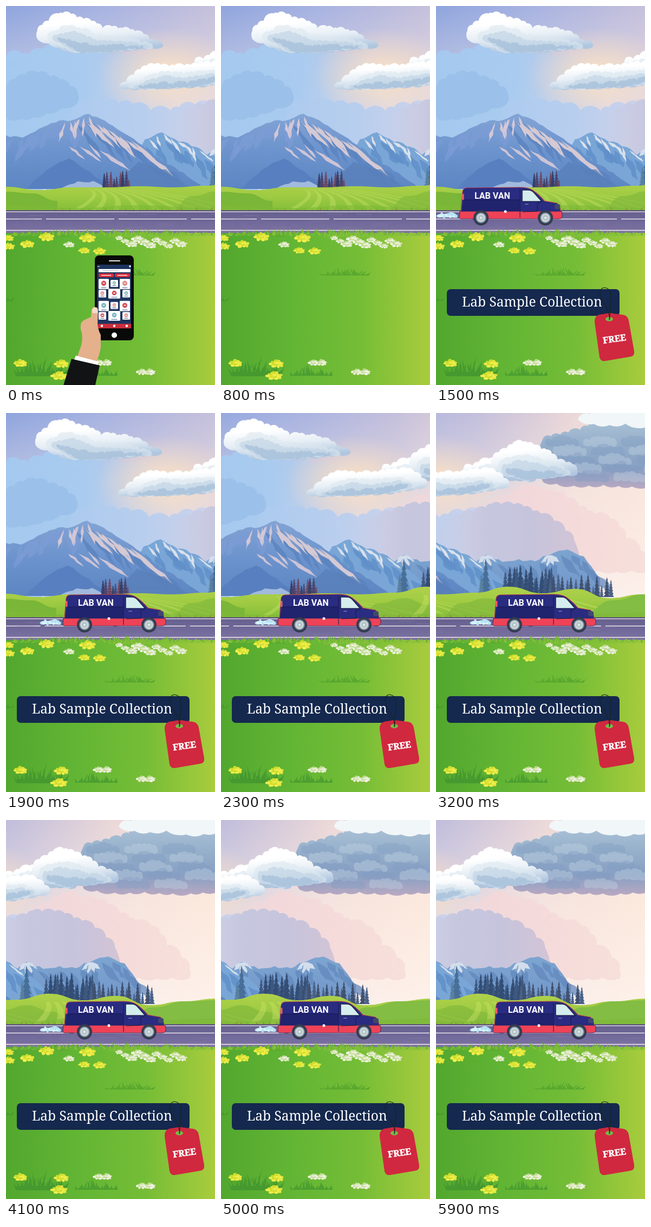
Write an HTML page that moves like this. It is 386 by 696 pixels and loops after 8000 ms.

```html
<!DOCTYPE html>
<html lang="en">
<head>
<meta charset="utf-8">
<title>Lab Sample Collection</title>
<style>
  html, body { margin: 0; width: 100%; height: 100%; overflow: hidden; background: #62b534; }
  svg { display: block; width: 386px; height: 696px; }
  .serif { font-family: "Noto Serif", serif; fill: #fff; }
  .sans { font-family: Roboto, sans-serif; font-weight: 700; fill: #fff; }
</style>
</head>
<body>
<svg id="stage" viewBox="0 0 386 696" xmlns="http://www.w3.org/2000/svg"></svg>
<script>
let seed = 7;
const random = () => {
  seed = (seed * 16807) % 2147483647;
  return seed / 2147483647;
};
const between = (a, b) => a + (b - a) * random();
const mix = (a, b, t) => a + (b - a) * t;
const repeat = (n, fn) => Array.from({ length: n }, (_, i) => fn(i)).join('');
const f = n => n.toFixed(1);

// Value at t (0..1) on evenly spaced keys.
function along(keys, t) {
  const p = Math.max(0, Math.min(1, t)) * (keys.length - 1);
  const i = Math.min(Math.floor(p), keys.length - 2);
  return mix(keys[i], keys[i + 1], p - i);
}

const path = (d, fill, extra = '') => `<path d="${d}" fill="${fill}" ${extra}/>`;
const rect = (x, y, w, h, fill, r = 0, extra = '') =>
  `<rect x="${f(x)}" y="${f(y)}" width="${f(w)}" height="${f(h)}" rx="${r}" fill="${fill}" ${extra}/>`;
const ellipse = (x, y, rx, ry, fill, extra = '') =>
  `<ellipse cx="${f(x)}" cy="${f(y)}" rx="${f(rx)}" ry="${f(ry)}" fill="${fill}" ${extra}/>`;
const disc = (x, y, r, fill, extra) => ellipse(x, y, r, r, fill, extra);
const opacity = a => `opacity="${a}"`;

// Colours are spread evenly; a colour may carry its own alpha.
const gradient = (id, end, ...colors) =>
  `<linearGradient id="${id}" ${end}>` +
  colors.map((c, i) => `<stop offset="${i / (colors.length - 1)}" stop-color="${c}"/>`).join('') +
  '</linearGradient>';
const across = 'x2="1"', down = 'x2="0" y2="1"';

// Soft mass with n round bumps between an upper and a lower line.
function billow(x0, x1, tops, bottoms, n, jitter, fill, extra) {
  const at = (keys, t, j) => [
    mix(x0, x1, t) + (t > 0 && t < 1 ? between(-0.3, 0.3) * (x1 - x0) / n : 0),
    along(keys, t) + between(-j, j)
  ];
  const upper = Array.from({ length: n + 1 }, (_, i) => at(tops, i / n, jitter));
  const m = Math.ceil(n * 0.6);
  const lower = Array.from({ length: m + 1 }, (_, i) => at(bottoms, 1 - i / m, jitter * 0.4));
  const points = [...upper, ...lower];
  let d = `M${points[0].map(f)}`;
  points.forEach((a, i) => {
    const b = points[(i + 1) % points.length];
    const r = f(Math.hypot(b[0] - a[0], b[1] - a[1]) * (i < n ? 0.66 : 1.1) + 0.1);
    d += `A${r} ${r} 0 0 1 ${b.map(f)}`;
  });
  return path(d + 'Z', fill, extra);
}

function cloud(x0, x1, tops, bottoms, n) {
  const layer = (lift, inset, fill, a) => {
    const w = (x1 - x0) * inset;
    const inner = tops.map((y, i) => mix(y, along(bottoms, i / (tops.length - 1)), lift));
    return billow(x0 + w, x1 - w, inner, bottoms, n, 3, fill, opacity(a));
  };
  return billow(x0, x1, tops, bottoms, n, 3.5, 'url(#cloud)') +
    layer(0.35, 0.08, '#dde8f1', 0.6) + layer(0.55, 0.12, '#bed2e5', 0.6) + layer(0.8, 0.16, '#9bb8d6', 0.55);
}

function ridge(x0, x1, keys, fill, extra, base = 336) {
  const n = (keys.length - 1) * 4;
  let d = `M${x0} ${base}`;
  for (let i = 0; i <= n; i++) d += `L${f(mix(x0, x1, i / n))} ${f(along(keys, i / n) + between(-2, 2))}`;
  return path(`${d}L${x1} ${base}Z`, fill, extra);
}

// Jagged tapering band running from (x, y) at an angle.
function gash(x, y, length, angle, width, fill, a = 1) {
  const c = Math.cos(angle), s = Math.sin(angle);
  const edge = (t, side) => {
    const w = side * width * Math.sin(Math.PI * t) * between(0.2, 1);
    return `${f(x + length * t * c - w * s)} ${f(y + length * t * s + w * c)}`;
  };
  const steps = [0, 0.2, 0.4, 0.6, 0.8, 1];
  return path(`M${steps.map(t => edge(t, 1)).join('L')}L${steps.map(t => edge(1 - t, -1)).join('L')}Z`, fill, opacity(a));
}

function slope(x0, x1, keys, fill, extra) {
  const step = (x1 - x0) / (keys.length - 1);
  let d = `M${x0} 378V${keys[0]}`;
  keys.slice(1).forEach((y, i) => {
    const x = x0 + step * i;
    d += `C${f(x + step / 2)} ${keys[i]} ${f(x + step / 2)} ${y} ${f(x + step)} ${y}`;
  });
  return path(d + 'V378Z', fill, extra);
}

function tree(x, base, h, fill) {
  let left = '', right = '';
  for (let i = 1; i <= 6; i++) {
    const y = f(base - h + h * i / 6), w = h * 0.026 * i + 0.7;
    right += `L${f(x + w)} ${y}L${f(x + w * 0.5)} ${y}`;
    left = `L${f(x - w * 0.5)} ${y}L${f(x - w)} ${y}` + left;
  }
  return path(`M${f(x)} ${f(base - h)}${right}${left}Z`, fill);
}
const forest = (n, x0, x1, base, h0, h1, ...fills) =>
  repeat(n, i => tree(mix(x0, x1, i / (n - 1)) + between(-2, 2), base, between(h0, h1), fills[i % fills.length]));

function blades(x0, x1, base, h, step, fill, lean = 1) {
  let d = '';
  for (let x = x0; x < x1; x += step) {
    const t = Math.sin(Math.PI * (x - x0) / (x1 - x0)) * 0.6 + 0.4;
    d += `M${f(x - 2)} ${base}L${f(x + between(-5, 7) * lean)} ${f(base - h * t * between(0.35, 1))}L${f(x + 3)} ${base}Z`;
  }
  return path(d, fill);
}

const flower = (x, y, r, colors) => repeat(18, i => {
  const turn = i * 2.4, d = Math.sqrt(i / 18) * r;
  return ellipse(x + d * Math.cos(turn), y + d * 0.55 * Math.sin(turn), r * between(0.2, 0.36), r * between(0.14, 0.26), colors[i % colors.length]);
});
const yellow = ['#c9dc2c', '#e2e53b', '#f1ee4d'];
const white = ['#bddb8d', '#dfe9c6', '#f1f3e4'];

const defs = `<defs>
${gradient('sky', across, '#8fa5de', '#a8b3e1', '#c3bfdc', '#ecd8d8', '#fae3d5')}
${gradient('air', down, '#fff3e900', '#fff0e688', '#fff6f1c0')}
${gradient('haze', across, '#a4c8ef', '#a9cbef', '#b9cfee00')}
${gradient('mist', across, '#abcbef', '#b8ceee', '#cfd3ea', '#e6d8e400')}
${gradient('blush', across, '#f2d6d800', '#f2d8da', '#f5dcda', '#f7dfda')}
${gradient('lilac', across, '#cdcde400', '#c6c8e0', '#c6c4dc', '#d3c4d6')}
${gradient('cloud', 'x2=".25" y2="1"', '#fff', '#fff', '#e6eef5', '#b0c6df')}
${gradient('storm', down, '#d3e2ed', '#a5bdd3', '#94aeca', '#879fc3', '#b9a9c2')}
${gradient('peak', down, '#83a4d5', '#6c93cd', '#5c86c2')}
${gradient('far', down, '#7da5d0', '#7196ca')}
${gradient('hill', down, '#b0d14b', '#9fcb43', '#82bc38')}
${gradient('road', down, '#655f8d', '#706999', '#7d73a2')}
${gradient('meadow', across, '#52a72e', '#62b534', '#75bd36', '#a9cc3d')}
<radialGradient id="glow"><stop stop-color="#fbe2c4"/><stop offset="1" stop-color="#fbdfc4" stop-opacity="0"/></radialGradient>
</defs>`;

const sky =
  rect(0, 0, 740, 340, 'url(#sky)') + rect(0, 0, 740, 340, 'url(#air)') +
  billow(2, 290, [90, 88, 68, 80, 86, 95, 110], [335, 335], 13, 3, 'url(#haze)') +
  ellipse(300, 125, 130, 85, 'url(#glow)') +
  billow(130, 520, [180, 172, 194, 180, 190, 200], [335, 335], 14, 6, 'url(#mist)') +
  billow(2, 132, [140, 124, 127, 160], [208, 206, 195, 180], 7, 4, '#9bc1ea') +
  billow(350, 690, [200, 160, 136, 148, 180, 205, 270], [290, 290], 18, 4, 'url(#blush)') +
  billow(310, 552, [205, 182, 166, 168, 190, 235], [335, 335], 13, 4, 'url(#lilac)') +
  cloud(58, 290, [48, 14, 18, 38, 42, 50, 72], [60, 84, 84, 80, 76], 19) +
  billow(495, 745, [45, 30, 5, -10, -10], [128, 134, 132, 136, 130], 15, 4, 'url(#storm)') +
  repeat(14, i => billow(500 + i * 14, 560 + i * 14, [50 + i % 5 * 16, 42 + i % 5 * 16, 52 + i % 5 * 16], [60 + i % 5 * 16, 62 + i % 5 * 16], 6, 3,
    i % 2 ? '#c0d3e1' : '#7f9bc1', opacity(0.4))) +
  billow(560, 745, [8, -4, -4, -4], [14, 24, 20, 28, 20], 9, 3, '#f1f6f8') +
  cloud(350, 480, [98, 86, 88, 104], [118, 120, 124], 9) +
  cloud(402, 558, [82, 55, 52, 66, 84, 104], [110, 122, 118, 112], 14) +
  cloud(209, 432, [146, 118, 105, 112, 106, 104, 128], [150, 152, 149, 146, 134], 17);

const summit = [239, 240, 226, 213, 209, 199, 210, 231, 249, 275, 293, 311, 335];
const shoulder = [300, 245, 231, 248, 258, 278, 300, 335];
const horizon = [310, 282, 261, 273, 270, 271, 258, 249, 264, 305];
const scatter = (x0, x1, keys, from, to, n, fn) => repeat(n, i => {
  const t = mix(from, to, i / (n - 1));
  return fn(mix(x0, x1, t), along(keys, t));
});

const mountains =
  ridge(330, 600, horizon, 'url(#far)') +
  scatter(330, 600, horizon, 0.15, 0.95, 12, (x, y) => gash(x, y + 8, between(30, 60), between(0.7, 1.3), 10, '#6389bd', 0.75)) +
  [391, 507].map(x => repeat(4, i => gash(x, 261, 22, 0.6 + i * 0.6, 5, '#d3deec'))).join('') +
  ridge(225, 445, shoulder, '#79a6d6') +
  scatter(225, 445, shoulder, 0.15, 0.8, 9, (x, y) => gash(x, y + 14, between(35, 65), between(0.7, 1.2), 11, '#608fc8', 0.8)) +
  scatter(225, 445, shoulder, 0.18, 0.6, 8, (x, y) => gash(x, y + 3, between(16, 36), between(0.5, 1.4), 4, '#d9e1ed')) +
  ridge(0, 365, summit, 'url(#peak)') +
  scatter(0, 365, summit, 0.04, 0.4, 9, (x, y) => gash(x, y + 4, between(40, 75), between(1.8, 2.4), 11, '#7d9cd6', 0.7)) +
  scatter(0, 365, summit, 0.36, 0.8, 12, (x, y) => gash(x, y + 12, between(45, 80), between(0.7, 1.1), 9, '#5b84c0', 0.8)) +
  scatter(0, 365, summit, 0.3, 0.42, 6, (x, y) => gash(x, y + 3, between(22, 42), between(1.2, 2.2), 4.5, '#d3c8d6')) +
  scatter(0, 365, summit, 0.4, 0.72, 12, (x, y) => gash(x, y + between(2, 16), between(35, 65), between(0.6, 0.95), 5, '#d5c9d3')) +
  scatter(0, 365, summit, 0.32, 0.52, 5, (x, y) => gash(x, y + between(45, 65), between(35, 55), between(0.6, 0.9), 4.5, '#cdc4d6')) +
  ridge(38, 194, [335, 300, 279, 305, 335], '#587fc0') +
  ridge(195, 345, [330, 288, 302, 335], '#587fb8', opacity(0.75)) +
  ridge(104, 190, [334, 323, 322, 334], '#a1badd') +
  forest(9, 183, 226, 335, 16, 34, '#373e66', '#4b466f', '#704861') +
  tree(389, 330, 63, '#486f98') + tree(381, 330, 34, '#59809f') +
  forest(17, 427, 511, 334, 30, 57, '#3e587f', '#334d74') +
  forest(15, 508, 620, 338, 18, 44, '#496187', '#41516f');

const hills =
  slope(0, 740, [332, 338, 333, 333, 331, 333, 330, 319, 331, 323, 340, 333, 328], 'url(#hill)') +
  slope(0, 95, [341, 344, 358], '#7ab638') +
  repeat(9, i => path(`M${150 + i * 9} 336Q${180 + i * 18} 345 ${120 + i * 38} 376h14Q${186 + i * 18} 345 ${154 + i * 9} 336Z`, '#c9e06b', opacity(0.4))) +
  slope(300, 480, [378, 349, 340, 352, 378], '#85b93d', opacity(0.7)) +
  repeat(7, i => path(`M${425 + i * 14} 334Q${430 + i * 22} 350 ${400 + i * 42} 376h16Q${442 + i * 22} 350 ${432 + i * 14} 334Z`, '#cce467', opacity(0.4))) +
  slope(565, 740, [372, 344, 333, 331], '#83bd43') +
  slope(0, 740, [365, 371, 366, 371, 364, 368, 364], '#7fba37', opacity(0.6)) +
  blades(0, 740, 377, 9, 13, '#8e963e');

const road =
  rect(0, 375, 740, 42, 'url(#road)') + rect(0, 375, 740, 1.2, '#514c71') + rect(0, 377, 740, 1.8, '#c8bfd3') +
  repeat(6, i => rect(i * 134 - 60, 390.5, 126, 1.5, '#e9e0ea')) +
  rect(0, 411, 740, 2, '#d6cbdc') +
  repeat(22, () => rect(between(0, 710), between(381, 408), 30, 0.8, '#8c82aa', 0, opacity(0.55)));

const yellowSpots = [[4, 426], [5, 441], [40, 437], [75, 424], [151, 426], [145, 449], [173, 450], [27, 656], [103, 657], [99, 679]];
const meadow =
  rect(0, 417, 386, 279, 'url(#meadow)') +
  ['#67b233', '#8abf3a', 'url(#meadow)'].map((c, i) => blades(-30, 416, 421 + i, 15, 5, c, 1.6)).join('') +
  blades(190, 300, 424, 14, 5, '#84c03a', 1.6) + blades(60, 120, 424, 13, 5, '#5dab30', 1.6) +
  blades(185, 272, 495, 17, 2.5, '#5aa82e', 2) + blades(0, 10, 542, 12, 3, '#4b9a2d') +
  rect(20, 672, 90, 8, '#45992f') + blades(20, 110, 679, 40, 2.5, '#45992f', 1.5) +
  blades(130, 206, 679, 23, 3.5, '#4c9f30') + blades(240, 278, 680, 14, 4, '#7eb83a') +
  yellowSpots.map(([x, y], i) => flower(x, y, 9 + i % 5, yellow)).join('') +
  flower(117, 438, 9, white) +
  repeat(11, i => flower(209 + i * 11.5, 426 + (i % 3) * 5 + i * 0.6, between(6, 10), white)) +
  [172, 186, 251, 266].map((x, i) => flower(x, i < 2 ? 655 : 672, 9, white)).join('');

const wheel = x =>
  disc(x, 389, 14, '#343b50') + disc(x, 389, 9, '#c9d6d8', 'stroke="#76859a" stroke-width="2"') +
  disc(x, 389, 5, '#b3c4c8') + disc(x, 389, 2, '#e8efed');

const van =
  repeat(15, i => ellipse(68 + i * 2.2, 386 + between(-5, 4), between(2, 6), between(1.5, 4), i % 2 ? '#d6f2fb' : '#b7e3f3')) +
  path('M108 378L111 341Q112 334 119 334L216 333Q232 333 240 338Q252 346 262 358L285 362Q291 366 292 378Z', '#292c80', 'stroke="#b6354f" stroke-width="1.2"') +
  path('M106 377H292Q295 377 295 381V386Q295 391 288 391H108Q105 391 105 386Z', '#ef4257', 'stroke="#3c2c59"') +
  path('M113 356H216V377H109Z', '#20236d') +
  path('M221 338H232Q239 338 243 343L257 359H221Z', '#d5eded', 'stroke="#202451" stroke-width="1.5"') +
  path('M217 336V389M113 356H217M222 378L249 377V363M258 359L248 363', 'none', 'stroke="#17194e"') +
  rect(110, 345, 3.5, 11, '#f05a63', 1) + rect(281, 364, 10, 9, '#42466f', 3) +
  rect(226, 363, 7, 2, '#6468a7', 1) + disc(190, 377.5, 2.5, '#fff') +
  '<text class="sans" x="133" y="354" font-size="16">LAB VAN</text>' + wheel(145) + wheel(264);

const label =
  rect(20, 520, 319, 49, '#15284e', 7) +
  '<text class="serif" x="48" y="551.5" font-size="24.5">Lab Sample Collection</text>' +
  path('M301 567Q292 570 293 581L302 645Q304 653 312 652L359 644Q367 643 366 634L356 578Q354 568 345 567L329 565Q320 563 313 565Z', '#d0283f') +
  ellipse(320, 575, 7, 4, '#79b94a') +
  path('M320 577C323 558 305 545 303 530C302 518 310 515 317 519C329 527 320 553 321 575', 'none', 'stroke="#17251f" stroke-width="1.1"') +
  '<text class="serif" transform="translate(309 620) rotate(-8)" font-size="16.3" font-weight="900" stroke="#fff" stroke-width=".6">FREE</text>';

const iconColors = ['#d34b5b', '#e08a8e', '#74b9c9'];
const tile = (x, y, w, h, color) =>
  rect(x, y, w, h, '#fff', 1.5) + disc(x + w / 2, y + h * 0.43, Math.min(w, h) * 0.24, color) +
  rect(x + w / 2 - 2, y + h * 0.37, 4, 2, '#f3dcc0') + rect(x + w * 0.25, y + h - 3, w * 0.5, 1, '#48638c');
// Wide side tiles alternate with a wide middle tile.
const tiles = repeat(4, row => {
  const y = 501 + row * 20.3, big = row % 2 === 0;
  const side = big ? 19 : 14, middle = big ? 14 : 22;
  const color = i => iconColors[(row + i) % 3];
  return tile(171, y, side, side, color(0)) + tile(229 - side, y, side, side, color(1)) +
    tile(200 - middle / 2, big ? y + 2 : y - 2, middle, big ? 13 : 18, color(2));
});

const phone =
  rect(164, 458, 72, 156, '#080909', 8) + rect(190, 467, 21, 2, '#e9e9e9', 1) +
  rect(168, 475, 63, 117, '#1d345e') + rect(171, 483, 59, 6, '#fff', 1) + rect(178, 485.5, 30, 1, '#aeb9c8') +
  [171, 201].map(x => rect(x, 491, 28, 7, '#d52f3f', 3) + rect(x + 5, 494, 18, 1.2, '#fff')).join('') +
  disc(229, 478, 1.8, '#fff') + rect(169, 478, 4, 1, '#fff') + tiles +
  rect(168, 583.5, 63, 8.5, '#c92e3d') + [177, 200, 223].map(x => disc(x, 587.5, 2.2, '#fff')).join('') +
  disc(200, 604.5, 5, '#fff') +
  path('M158 558Q160 552 166 553Q171 554 170 562L169 585Q171 597 175 604V627Q173 640 166 657L130 649L139 623Q143 607 138 594Q136 581 144 577L157 571Z', '#e5b08c') +
  path('M159 558Q161 553 166 554Q170 556 169 564H160Z', '#f5ddca') +
  path('M129 642L171 653L168 663L125 652Z', '#fff') +
  path('M121 648L173 660L164 700H105Z', '#121315');

document.getElementById('stage').innerHTML = defs +
  `<g id="world">${sky}${mountains}${hills}${road}</g><g id="van">${van}</g>` +
  `${meadow}<g id="label">${label}</g><g id="phone">${phone}</g>`;

const LOOP = 8000;
const SINE = 'cubic-bezier(.37,0,.63,1)';

// Steps are [ms, value, easing to the next step].
function play(id, steps, style) {
  const frames = [...steps, [LOOP, steps[steps.length - 1][1]]].map(([ms, value, easing = 'linear']) =>
    ({ offset: ms / LOOP, easing, ...style(value) }));
  document.getElementById(id).animate(frames, { duration: LOOP, iterations: Infinity });
}
const slideX = x => ({ transform: `translateX(${x}px)` });
const slideY = y => ({ transform: `translateY(${y}px)` });

play('phone', [[0, 0], [50, 0, SINE], [900, 250]], slideY);
play('van', [[0, -305], [800, -305, SINE], [1800, 0]], slideX);
play('label', [[0, 0], [800, 0], [1300, 1]], a => ({ opacity: a }));
play('world', [
  [0, 0], [1800, 0, 'cubic-bezier(.42,0,.8,.6)'], [2300, -51], [2700, -172],
  [3200, -297, 'cubic-bezier(.2,.4,.6,1)'], [3680, -351]
], slideX);
</script>
</body>
</html>
```
